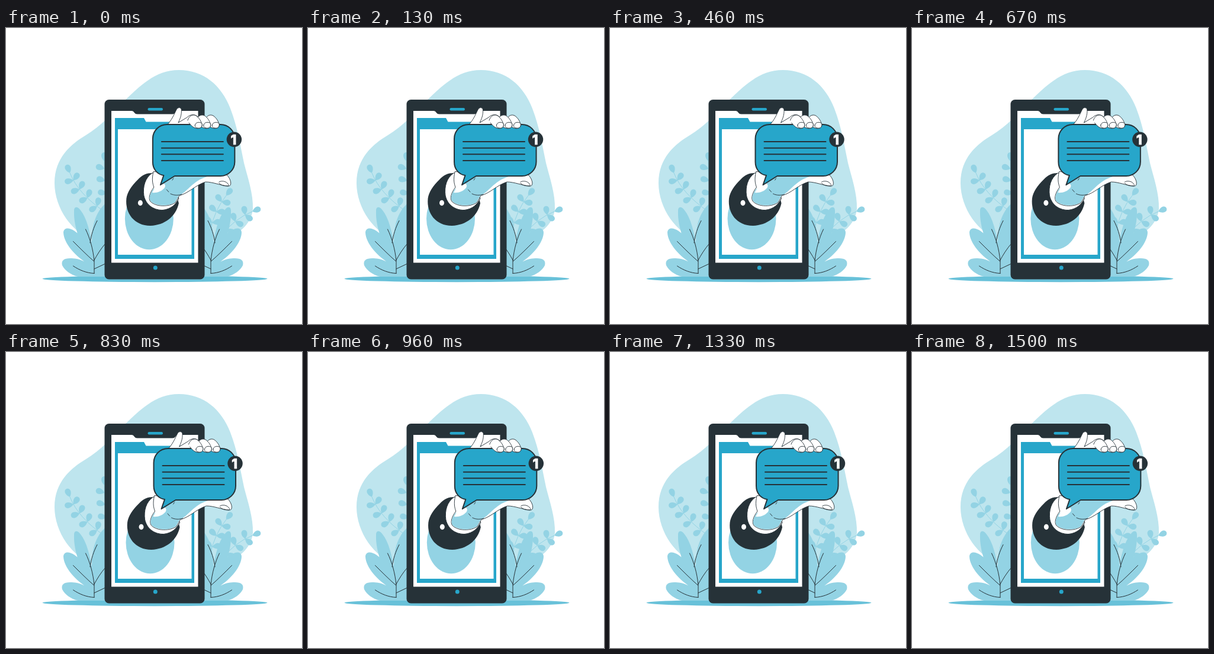
Animation of 500 by 500 pixels, one loop 1540 ms. Source, as an HTML page:

```html
<!DOCTYPE html>
<html lang="en">
<head>
<meta charset="utf-8">
<title>Message on a phone</title>
<style>
  html, body { margin: 0; height: 100%; overflow: hidden; background: #fff; }
  svg { display: block; width: 100vw; height: 100vh; }
  .dark { fill: #263238; }
  .blue { fill: #27a6ca; }
  .light { fill: #93d3e4; }
  .white { fill: #fff; }
  .vein, .skin { stroke: #263238; stroke-linecap: round; stroke-linejoin: round; }
  .vein { fill: none; }
  .skin { fill: #fff; }
  .stem { fill: none; stroke: #93d3e4; }
</style>
</head>
<body>
<svg viewBox="0 0 500 500">
  <defs>
    <path id="leaf" d="M0 0C-8-8-5-15 0-15S8-8 0 0Z"/>
    <g id="bush">
      <path class="light" d="M148 398C126 370 114 336 115 309C115 301 121 301 126 308C137 322 141 343 145 362C144 338 151 309 170 295V420H122C109 417 99 409 95 401C92 390 102 387 120 390C128 392 136 396 141 400C117 386 98 364 97 346C97 337 106 336 116 343C134 355 143 378 148 398Z"/>
      <path class="vein" d="M149 414.500V393C147 374 142 355 134.500 340M142 363C144 349 148 337 154 325.500M148.500 394C137 384 125 372 113.500 360.500M148.500 393C154 383 160 373 168 364M149 414.500C136 414 124 409 113.500 402M149 407L168 398"/>
    </g>
    <g id="finger" class="skin" stroke-width=".9">
      <path d="M307 156C309 149 315 145 321 148C327 152 330 158 331.500 164C331 169 325 171 320 169C314 167 312 163 309 160"/>
      <path d="M319.500 164C320 159 327 158 331 161C332 166 330 170 324 169C320 168 319 167 319.500 164Z"/>
    </g>
  </defs>

  <path fill="#bee5ee" d="M202 121C225 100 251 71 292 71C334 71 364 97 379 136C391 167 396 200 402 228C408 252 418 280 417 306C414 331 394 351 360 358H150C112 348 82 304 82 262C82 219 110 196 135 181C160 166 180 144 202 121Z"/>
  <ellipse cx="251.500" cy="423.600" rx="190" ry="5.600" fill="#68c1d9"/>
  <g id="twigs" class="light"></g>
  <use href="#bush"/>
  <use href="#bush" transform="translate(495) scale(-1 1)"/>

  <rect class="dark" x="166.500" y="121" width="169" height="303.500" rx="7.500"/>
  <path class="white" d="M178 140H212C217 140 216 145.500 222 145.500H281C287 145.500 286 140 291 140H324.500V396.500H178Z"/>
  <rect class="blue" x="239.500" y="135" width="25.500" height="4.500" rx="2.200"/>
  <circle class="blue" cx="252.300" cy="405" r="3.500"/>
  <path class="blue" fill-rule="evenodd" d="M184 152H233L236.500 158.500H318V390H184ZM189 171V383H313.500V171Z"/>

  <g id="hand">
    <ellipse class="light" cx="242" cy="322" rx="41" ry="52.300"/>
    <path class="dark" d="M247 245C238 245 230 248 223 256C212 267 205 277 203.500 288C201 313 217 334 244 334C268 333 287 319 292 296L290 288Z"/>
    <ellipse class="white" cx="227" cy="295.500" rx="4" ry="4.700"/>
    <path class="skin" d="M247 245C235 253 231 268 233 283C237 301 252 308 265 307.500C279 306 287 298 292 288L283 262Z"/>
    <path class="skin" d="M249 243C246 257 248 263 250 269C243 278 240 288 244 293C254 303 276 302 286 295C289 291 291 286 293 283C309 279 319 266 337 260C350 260 362 266 376 267C382 267 381 256 373 248Z" stroke-width=".9"/>
    <path class="light" d="M249 272C243 280 241 288 244.500 292.500C254 302 276 301 285.500 294.500L292 283C306 278 315 258 340 251V248H285L264 264Z"/>
    <path class="white" d="M250 250L261 264C267 260 271 265 268 270C263 276 255 279 247 278L252 269Z"/>
    <path class="vein" d="M281 257L283 254M271.500 273L275 277M278 280C284 283 291 283 297 281M360 260C363 258 370 258 374 262C376 264 377 267 375 267C369 267 363 266 360 262" stroke-width=".9"/>
    <path class="skin" d="M272 164C280 156 284 146 288 138C290 134 295 133 296.500 138C297 147 294 154 291 160L306 151C311 146 318 145 323 149L344 164Z" stroke-width=".9"/>

    <path class="blue" stroke="#263238" stroke-width="2" stroke-linejoin="round" d="M272 163H362A24 24 0 0 1 386.500 187V226A24 24 0 0 1 362 250H285L261 265L266.500 249C255 247 248 238 248 226V187A24 24 0 0 1 272 163Z"/>
    <path stroke="#263238" stroke-width="2" stroke-linecap="round" d="M263 192H367M263 202.700H367M263 213.300H367M263 224H367"/>
    <circle class="dark" cx="385.500" cy="188.300" r="12.700"/>
    <text class="white" x="384.500" y="197" text-anchor="middle" font-family="Inter, sans-serif" font-weight="800" font-size="23" stroke="#fff" stroke-width=".6" stroke-linejoin="round">1</text>
    <path class="white" d="M293 162L306 152L316 150L322 160L307 162Z"/>
    <use href="#finger" x="29"/>
    <use href="#finger" x="14.500"/>
    <use href="#finger"/>
  </g>
</svg>
<script>
  const $ = id => document.getElementById(id);

  // A curved stem from a to c, bent towards b, with leaf pairs and one leaf at the tip
  function twig(a, b, c, pairs) {
    const leaf = (t, spread) => {
      const [x, y] = [0, 1].map(k =>
        (1 - t) ** 2 * a[k] + 2 * t * (1 - t) * b[k] + t * t * c[k]);
      const [dx, dy] = [0, 1].map(k => (1 - t) * (b[k] - a[k]) + t * (c[k] - b[k]));
      const angle = Math.atan2(dx, -dy) * 180 / Math.PI + spread;
      return `<use href="#leaf" transform="translate(${x} ${y}) rotate(${angle})"/>`;
    };
    let svg = `<path class="stem" d="M${a}Q${b} ${c}"/>` + leaf(1, 0);
    for (let i = 1; i <= pairs; i++) {
      const t = (i - 0.35) / pairs * 0.9;
      svg += leaf(t, -70) + leaf(t, 65);
    }
    return svg;
  }

  $('twigs').innerHTML =
    twig([166, 310], [122, 280], [108, 245], 4) +
    twig([172, 295], [166, 255], [166, 225], 3) +
    twig([345, 342], [352, 308], [372, 283], 3) +
    twig([362, 352], [386, 322], [416, 310], 3);

  const LOOP = 1540, CYCLE = 1500, STEP = 1000 / 24, LEAD = 20;

  // Horizontal shake: the second half of the cycle mirrors the first
  const shake = [0, -1, 2, -4, 4, -4];
  function shakeAt(time) {
    const pos = 5 - Math.abs(time % CYCLE / CYCLE * 10 - 5);
    const i = Math.min(Math.floor(pos), 4);
    return shake[i] + (shake[i + 1] - shake[i]) * (pos - i);
  }

  function draw(now) {
    const step = Math.floor((now % LOOP + 5) / STEP);
    $('hand').setAttribute('transform', `translate(${shakeAt(step * STEP + LEAD)})`);
    requestAnimationFrame(draw);
  }
  requestAnimationFrame(draw);
</script>
</body>
</html>
```
